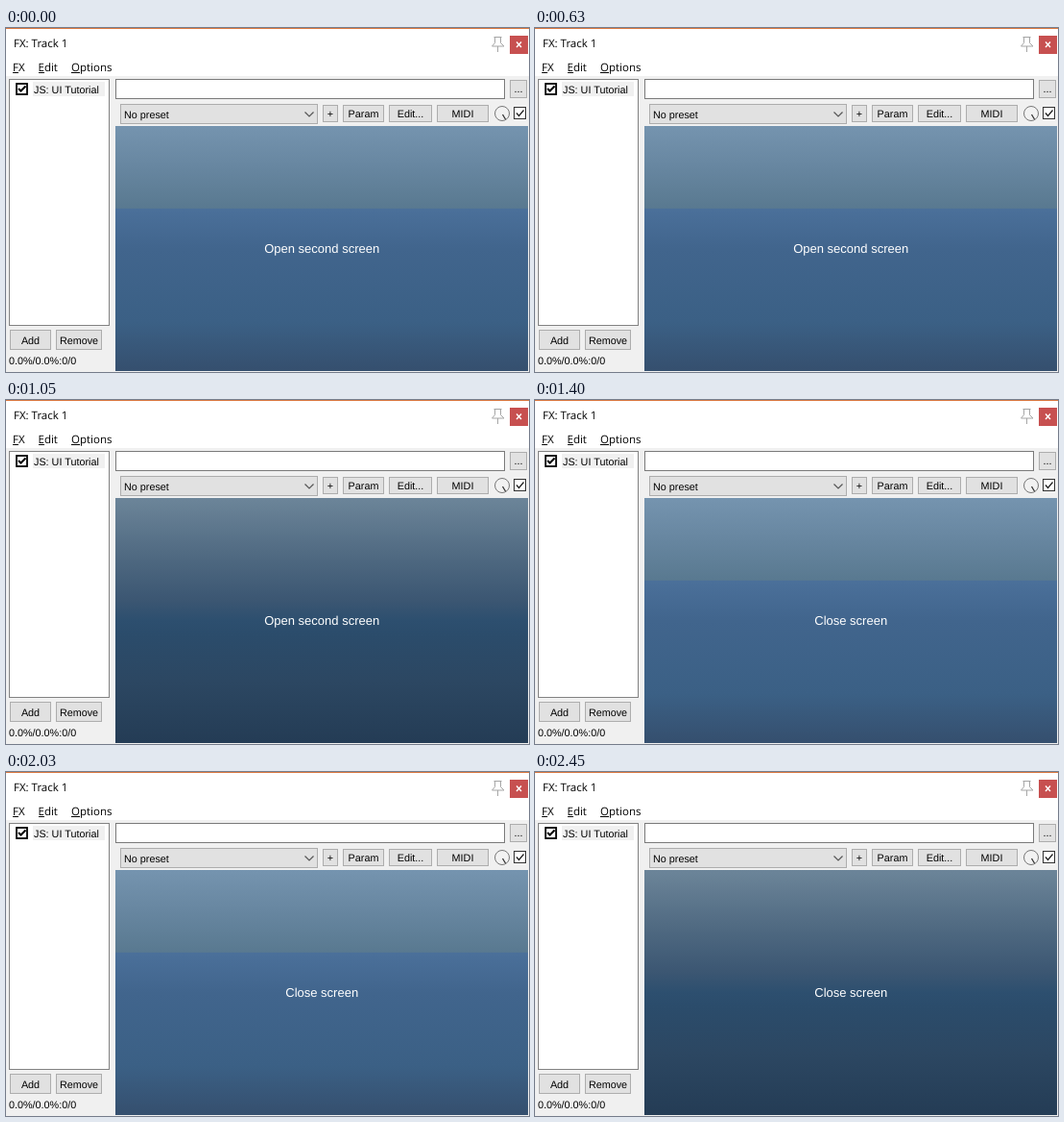
Animation of 545x358 px, one loop 2.8 s. Source, as an HTML page:

```html
<!DOCTYPE html>
<html lang="en">
<head>
<meta charset="utf-8">
<title>FX: Track 1</title>
<style>
  html, body { margin: 0; width: 100%; height: 100%; overflow: hidden; background: #f0f0f0; }
  svg { display: block; }
  text { font: 10.8px "Liberation Sans", Arial, sans-serif; fill: #000; text-rendering: geometricPrecision; white-space: pre; }
  .menu { font: 11.5px "Open Sans", sans-serif; }
  .label { font-size: 13px; fill: #fff; text-anchor: middle; }
  .mid { text-anchor: middle; }
</style>
</head>
<body>
<svg id="stage" width="545" height="358" viewBox="0 0 545 358">
  <defs>
    <linearGradient id="idle" x1="0" y1="0" x2="0" y2="1">
      <stop offset="0" stop-color="#7594af"/>
      <stop offset=".17" stop-color="#6786a0"/>
      <stop offset=".335" stop-color="#597990"/>
      <stop offset=".337" stop-color="#4b709a"/>
      <stop offset=".5" stop-color="#41658d"/>
      <stop offset=".8" stop-color="#3b6085"/>
      <stop offset="1" stop-color="#354f6e"/>
    </linearGradient>
    <linearGradient id="pressed" x1="0" y1="0" x2="0" y2="1">
      <stop offset="0" stop-color="#6c8599"/>
      <stop offset=".24" stop-color="#4f6981"/>
      <stop offset=".42" stop-color="#3b5672"/>
      <stop offset=".5" stop-color="#2d4f6f"/>
      <stop offset=".56" stop-color="#2b4c6b"/>
      <stop offset=".75" stop-color="#2c4762"/>
      <stop offset="1" stop-color="#243c55"/>
    </linearGradient>
  </defs>

  <rect width="545" height="358" fill="#f0f0f0"/>
  <rect width="545" height="50" fill="#fff"/>
  <rect width="545" height="1" fill="#dc7a42"/>

  <!-- title bar -->
  <text class="menu" x="8" y="20">FX: Track 1</text>
  <g fill="none" stroke="#a5a5a5">
    <path d="M508.5 9.5h8M509.5 9.5v6M515.5 9.5v6M509.5 15.5l-3 3.5h12.500l-3.500-3.500M512.500 19v6"/>
  </g>
  <rect x="525" y="8" width="19" height="19" fill="#c75050"/>
  <path d="M532 14.500l5 5.500m0-5.500l-5 5.500" stroke="#fff" stroke-width="1.400"/>

  <!-- menu -->
  <text class="menu" x="7" y="45">FX</text>
  <text class="menu" x="33.500" y="45">Edit</text>
  <text class="menu" x="68" y="45">Options</text>
  <path d="M7 46.500h6M34 46.500h6M68 46.500h9" stroke="#000"/>

  <!-- effect list -->
  <rect x="3.500" y="53.500" width="104" height="256" fill="#fff" stroke="#828282"/>
  <rect x="28" y="56" width="75" height="15" fill="#f0f0f0"/>
  <rect x="11" y="58" width="11" height="11" fill="#fff" stroke="#000" stroke-width="1.800"/>
  <path d="M13 63l2.500 2.500 5-5" fill="none" stroke="#000" stroke-width="2"/>
  <text x="29" y="68">JS: UI Tutorial</text>
  <text x="3" y="350">0.0%/0.0%:0/0</text>

  <!-- toolbar -->
  <rect x="114.500" y="53.500" width="405" height="20" fill="#fff" stroke="#7a7a7a"/>
  <g id="buttons"></g>
  <text x="123" y="94">No preset</text>
  <path d="M311.500 87.500l4.500 4.500 4.500-4.500" fill="none" stroke="#555" stroke-width="1.200"/>
  <circle cx="517" cy="89" r="7.500" fill="#f2f2f2" stroke="#777"/>
  <path d="M517.500 90l3 5" stroke="#333" stroke-width="1.300"/>
  <rect x="529.500" y="82.500" width="12" height="12" fill="#fff" stroke="#333"/>
  <path d="M532 88.500l2.500 3 5-6" fill="none" stroke="#222" stroke-width="1.300"/>

  <!-- plugin panel -->
  <rect id="panel" x="114" y="102" width="430" height="255" fill="url(#idle)"/>
  <text id="label" class="label" x="329.200" y="234">Open second screen</text>
</svg>
<script>
const HOLD = 1050, PRESS = 350, STEP = HOLD + PRESS;
const LABELS = ["Open second screen", "Close screen"];

const panel = document.getElementById("panel");
const label = document.getElementById("label");

function button(x, y, w, h, text, base) {
  return `<rect x="${x + .5}" y="${y + .5}" width="${w - 1}" height="${h - 1}" fill="#e1e1e1" stroke="#adadad"/>` +
    `<text class="mid" x="${x + w / 2}" y="${base}">${text}</text>`;
}

document.getElementById("buttons").innerHTML = [
  [525, 54, 18, 19, "...", 67],
  [119, 79, 206, 21, "", 94],
  [330, 80, 16, 18, "+", 93],
  [351, 80, 43, 18, "Param", 93],
  [399, 80, 45, 18, "Edit...", 93],
  [449, 80, 54, 18, "MIDI", 93],
  [4, 314, 43, 21, "Add", 329],
  [52, 314, 48, 21, "Remove", 329]
].map(b => button(...b)).join("");

function draw(ms) {
  const t = ms % (STEP * LABELS.length);
  const screen = Math.floor(t / STEP);
  panel.setAttribute("fill", t % STEP < HOLD ? "url(#idle)" : "url(#pressed)");
  label.textContent = LABELS[screen];
}

const start = performance.now();
function tick() {
  draw(performance.now() - start);
  requestAnimationFrame(tick);
}
tick();
</script>
</body>
</html>
```
